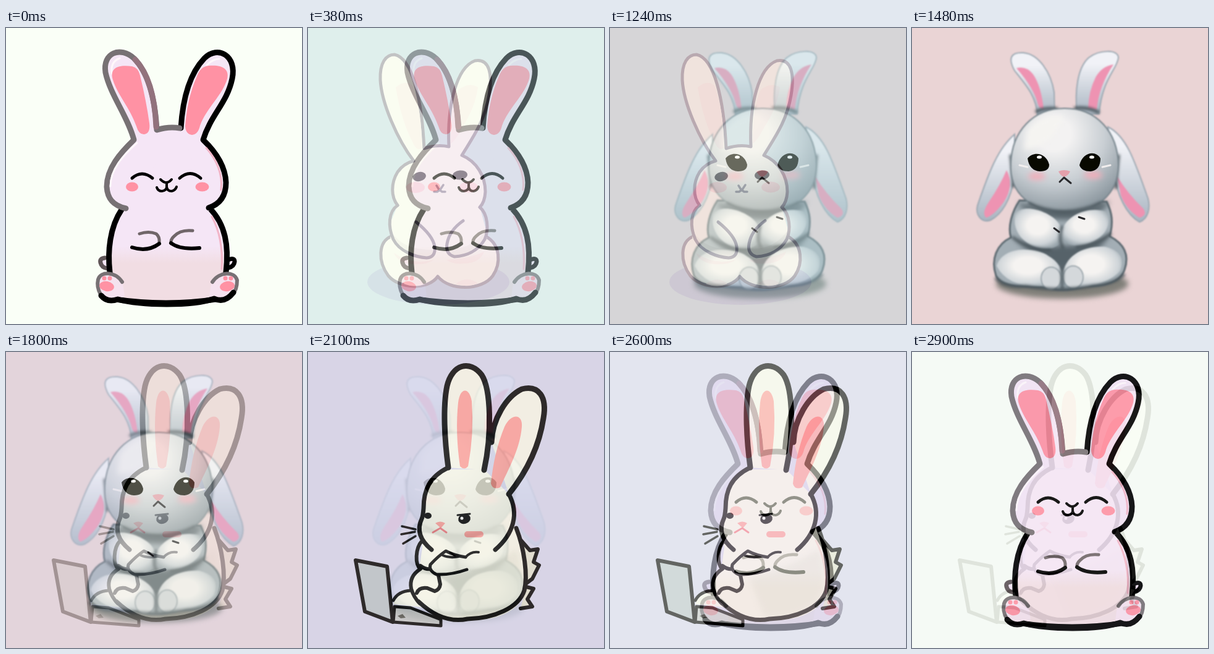
These frames come from a looping animation (479 by 479 pixels, 2960 ms). An HTML page:

```html
<!DOCTYPE html>
<html lang="en">
<head>
<meta charset="utf-8">
<title>Four rabbits</title>
<style>
  html, body { margin: 0; height: 100%; overflow: hidden; }
  svg { display: block; width: 100vw; height: 100vh; }
  .line { fill: none; }
  .line, .ink { stroke-linecap: round; stroke-linejoin: round; }
  .soft { filter: blur(4px); }
  .crease { fill: none; stroke: #465157; filter: blur(2.2px); }
  .hazy { filter: blur(.8px); }
</style>
</head>
<body>
<svg viewBox="0 0 479 479">
  <defs>
    <linearGradient id="belly" x2="0" y2="1">
      <stop offset=".4" stop-color="#f5e6f6"/><stop offset=".58" stop-color="#f1dde3"/>
    </linearGradient>
    <radialGradient id="fur" cx=".4" cy=".25" r=".8">
      <stop offset=".2" stop-color="#f3f2f2"/><stop offset=".6" stop-color="#c8ced3"/><stop offset="1" stop-color="#87939b"/>
    </radialGradient>
    <radialGradient id="paw" cx=".48" cy=".42" r=".62">
      <stop offset=".35" stop-color="#f5f3f1"/><stop offset=".75" stop-color="#ced4d8"/><stop offset="1" stop-color="#98a4ab"/>
    </radialGradient>
    <linearGradient id="lop" x2="0" y2="1">
      <stop offset=".2" stop-color="#f1f2f7"/><stop offset="1" stop-color="#a9b5c1"/>
    </linearGradient>
  </defs>

  <!-- smiling pink rabbit -->
  <g class="scene">
    <path fill="#fafff7" d="M0 0h479v479H0z"/>
    <g class="ink" stroke="#000" stroke-width="9" fill="#f5e6f6">
      <path stroke="#5f5557" stroke-width="7" d="M160 372Q151 373 153 380Q155 388 164 389"/>
      <path stroke-width="7" d="M360 375Q370 371 370 378Q369 386 360 388"/>
      <path fill="url(#belly)" d="M187 294C168 322 164 362 168 395L170 438Q260 452 346 438L356 395C361 352 355 318 330 292"/>
      <path stroke="none" d="M207 181C188 199 164 222 163 254C163 274 172 286 194 296H328C347 284 356 268 354 246C352 221 338 200 319 181L366 78L345 42L302 71L283 162Q263 159 244 164L238 110L206 48L162 58Z"/>
      <path d="M283 162C286 114 298 73 321 49C343 27 374 45 366 82C358 121 331 141 319 181C340 201 355 225 356 250C356 272 346 285 328 291"/>
      <g stroke="#777174">
        <path d="M194 292C172 287 164 275 163 257C163 227 185 202 207 181C197 143 169 109 161 72C156 40 185 29 207 49C230 72 241 112 244 165Q263 159 281 162"/>
        <path class="line" stroke="#92727d" d="M209 51C230 73 241 112 243 160"/>
      </g>
    </g>
    <path class="line" stroke="#fff8fb" stroke-width="3" d="M171 74Q169 54 184 49M169 256C169 228 190 206 212 186M325 60Q335 50 345 50"/>
    <path class="line" stroke="#f3b6c8" stroke-width="3" d="M324 194C341 213 351 237 348 262M333 305Q352 340 349 390"/>
    <g fill="#ff92a4">
      <path d="M173 84C167 64 182 59 204 62Q214 64 217 77Q227 118 232 154Q234 170 224 172Q215 173 211 159C201 130 181 109 173 84Z"/>
      <path d="M358 82C362 66 349 59 328 61Q315 62 309 78C297 105 292 133 290 159Q291 172 301 173Q311 172 314 158C324 130 351 108 358 82Z"/>
      <ellipse cx="204" cy="257" rx="10" ry="7.5"/><ellipse cx="317.500" cy="257" rx="11" ry="7.5"/>
    </g>
    <g class="line" stroke="#000" stroke-width="5">
      <path d="M204 243Q220 229 237 243M281 243Q298 228 315 243"/>
      <path stroke-width="4" d="M250 245Q255 250 259 250Q264 250 268 245M260 251V257M244 258Q246 264 252 264Q260 263 260 257Q261 264 268 264Q274 263 276 257"/>
      <path stroke="#706669" d="M216 333Q231 328 243 333Q249 338 248 347M302 328Q282 326 272 337Q266 342 267 349"/>
      <path stroke-width="6" d="M204 355Q229 363 248 349M267 348Q281 359 313 356"/>
    </g>
    <g class="ink" stroke="#777174" stroke-width="6" fill="#f5e2ef">
      <path d="M189 413C177 394 153 393 149 407C147 427 157 441 176 440L192 434Z" stroke="none"/>
      <path class="line" d="M188 411C177 394 153 393 149 407C147 416 149 424 153 431"/>
      <path d="M332 413C344 394 370 393 374 408C374 425 364 441 344 440L329 434Z" stroke="none"/>
      <path class="line" d="M334 411C345 394 370 393 374 408C374 419 371 427 366 432"/>
      <path class="line" stroke="#000" stroke-width="9" d="M154 433Q164 445 181 439Q210 447 260 447Q310 447 337 438Q354 446 368 428"/>
    </g>
    <g fill="#ff92a4">
      <ellipse cx="163" cy="418" rx="12" ry="8" transform="rotate(10 163 418)"/>
      <ellipse cx="358" cy="418" rx="12" ry="8" transform="rotate(-10 358 418)"/>
      <circle cx="159" cy="405" r="3.500"/><circle cx="168" cy="405" r="3.500"/>
      <circle cx="355" cy="405" r="3.500"/><circle cx="364" cy="405" r="3.500"/>
    </g>
  </g>

  <!-- cream rabbit on blue -->
  <g class="scene">
    <path fill="#b8d8dc" d="M0 0h479v479H0z"/>
    <ellipse cx="211" cy="411" rx="115" ry="37" fill="#a2b7d0"/>
    <g class="ink" stroke="#716a79" stroke-width="5" fill="#fbfbea">
      <path d="M135 337C113 346 113 378 130 401C148 422 194 425 210 402C229 426 282 425 299 401C313 380 311 351 289 338Z"/>
      <g fill="#fbebdf" stroke="none">
        <path d="M139 364Q170 385 204 375Q192 384 167 382Q145 379 139 364ZM224 375Q259 374 285 362Q278 380 254 381Q233 383 224 375Z"/>
        <path d="M155 414Q174 400 190 414Q174 421 155 414ZM239 414Q257 400 275 413Q257 421 239 414Z"/>
      </g>
      <path stroke="none" d="M145 287L171 215L249 206L278 289L290 340L224 375H200L133 340Z"/>
      <path stroke="none" d="M145 287L132 318L150 358L190 372L206 357L224 357L240 370L270 360L289 330L278 290Z"/>
      <g stroke="none" fill="#ecebda">
        <path d="M135 330Q153 359 201 359Q205 370 190 371Q143 364 135 330ZM228 357Q266 359 289 326Q289 363 237 370Q228 367 228 357Z"/>
      </g>
      <path stroke="none" d="M145 287H278L288 262L249 206H171L136 262Z"/>
      <path d="M145 287C134 273 134 251 145 233Q155 219 171 215C145 181 119 122 117 84C116 56 126 43 140 43C169 49 184 115 188 195Q208 188 228 192C225 126 240 64 270 53C293 49 299 73 293 109C286 151 266 178 249 206C273 216 287 240 287 265Q286 282 278 290"/>
      <path class="line" d="M145 287C130 297 129 321 138 342C148 362 175 371 192 372Q207 371 205 354C203 340 190 326 175 314M278 290C291 301 293 326 286 342C275 361 256 369 237 370Q222 366 225 349C228 332 238 321 251 312"/>
    </g>
    <g fill="#fcece0">
      <path d="M142 96Q157 83 169 93Q185 137 184 194Q177 200 171 188Q151 151 142 96Z"/>
      <path d="M244 100Q260 87 275 96Q270 130 250 160Q238 183 231 187Q230 130 244 100Z"/>
    </g>
    <ellipse cx="180" cy="240.500" rx="11" ry="7.500" transform="rotate(-12 180 240)"/>
    <ellipse cx="246" cy="238" rx="12" ry="7.500" transform="rotate(-6 246 238)"/>
    <g fill="#fdd2cd"><ellipse cx="174" cy="258" rx="15" ry="9"/><ellipse cx="260" cy="257.500" rx="15" ry="9"/></g>
    <path class="line" stroke="#686873" stroke-width="3.500" d="M208 255L213 263L219 254M204 265H209L213 262L217 265L222 265"/>
  </g>

  <!-- painted grey rabbit -->
  <g class="scene">
    <path fill="#ead4d5" d="M0 0h479v479H0z"/>
    <ellipse class="soft" cx="243" cy="414" rx="107" ry="24" fill="#807f79"/>
    <g class="hazy">
      <g fill="url(#lop)" stroke="#9aa7b1" stroke-width="2">
        <path d="M203 142C201 111 186 94 166 69C154 47 162 39 180 40C205 42 225 72 230 104L231 140Z"/>
        <path d="M267 140C263 101 268 64 286 48C303 35 334 34 334 48C332 67 307 83 303 139Z"/>
        <path d="M166 172C139 195 125 232 106 287C102 303 113 316 127 311C145 302 160 279 166 239Z"/>
        <path d="M317 160C346 174 359 211 382 276C386 292 382 309 368 314C347 302 332 271 327 235Z"/>
      </g>
      <g fill="#ee93b2">
        <path d="M169 65Q185 61 196 75Q209 94 213 131Q207 132 204 124Q198 98 169 65Z"/>
        <path d="M326 59Q307 62 297 80Q286 102 285 130L299 132Q302 95 326 59Z"/>
        <path d="M153 230Q166 254 149 281Q133 303 120 307Q112 300 124 282Q143 254 153 230Z"/>
        <path d="M332 240Q349 268 374 292Q382 303 368 307Q347 294 338 271Z"/>
      </g>
      <path class="crease" stroke-width="5" d="M200 136Q213 128 236 131M262 130Q285 127 303 137M160 205Q165 245 164 258M334 205Q329 245 330 260"/>
      <path fill="#a3aeb5" stroke="#5c6970" stroke-width="3" d="M174 279C161 298 155 322 160 339C137 350 127 374 136 401C146 420 183 419 211 419Q244 430 280 418C309 419 337 412 344 391C353 365 341 348 320 337C326 315 324 299 315 281Z"/>
      <path class="soft" fill="#566269" d="M171 282Q246 306 319 280Q310 306 248 310Q187 308 171 282ZM163 337Q193 356 240 352Q291 354 322 332Q303 366 243 392Q187 366 163 337Z"/>
      <g fill="url(#paw)">
        <path d="M167 301C180 283 220 296 235 313C252 335 241 357 220 357C191 359 160 335 167 301Z"/>
        <path d="M243 327C251 301 288 288 314 297C329 324 301 350 268 352C249 353 239 341 243 327Z"/>
        <path d="M137 385C147 352 200 354 221 369Q244 382 242 405Q234 426 211 418Q154 420 137 385Z"/>
        <path d="M244 400C247 370 275 352 313 354Q348 362 337 393Q318 416 257 422Q241 419 244 400Z"/>
      </g>
      <g fill="#d4d8db" stroke="#8c989f" stroke-width="1.500">
        <ellipse cx="225" cy="405" rx="16" ry="18"/><ellipse cx="261" cy="403" rx="16" ry="18"/>
      </g>
      <path class="crease" stroke-width="4" d="M135 404Q148 421 184 418Q242 428 294 417Q330 414 344 398M243 320Q236 342 245 357M162 338Q190 360 225 359M265 355Q302 351 322 332M243 385V422"/>
      <path fill="url(#fur)" stroke="#75838b" stroke-width="2" d="M247 130C195 130 162 168 160 218C157 269 193 297 247 296C301 297 333 270 334 222C333 168 299 130 247 130Z"/>
      <path class="soft" fill="#f5f4f1" d="M186 166Q211 139 244 142Q234 188 181 198Z"/>
      <g class="soft" fill="#f1adb9"><ellipse cx="202" cy="240" rx="14" ry="6"/><ellipse cx="293" cy="238" rx="15" ry="6"/></g>
      <path class="crease" stroke-width="4" d="M188 283Q246 311 307 282"/>
    </g>
    <path fill="#080900" d="M187 211C197 199 217 202 222 221Q222 232 207 232Q190 231 187 211ZM271 222C276 201 297 197 305 211Q305 230 289 232Q274 232 271 222Z"/>
    <g fill="#fff"><ellipse cx="206" cy="209" rx="4" ry="2.500"/><ellipse cx="291" cy="209" rx="4" ry="2.500"/></g>
    <path class="line" stroke="#f1eeee" stroke-width="3" d="M174 222L187 225M308 225L321 222"/>
    <path fill="#e3a0ab" d="M237 232Q246 228 256 232Q252 240 246 241Q240 239 237 232Z"/>
    <path class="line" stroke="#28282b" stroke-width="3" d="M239 249L246 242L257 251M230 324L238 330M270 306L279 309"/>
  </g>

  <!-- rabbit with laptop -->
  <g class="scene">
    <path fill="#d4d5eb" d="M0 0h479v479H0z"/>
    <g class="ink" stroke="#000" stroke-width="6" fill="#f5f5e7">
      <path fill="#c3c6c6" stroke-width="5" d="M138 437L140 412L166 414L215 433V443Z"/>
      <path stroke="none" fill="#55564f" d="M145 427L153 424L158 430L150 431Z"/>
      <path fill="#b9c3c8" d="M77 337L128 347L137 437L92 420Z"/>
      <path stroke="none" d="M138 408Q145 387 166 385L185 413Z"/>
      <path class="line" stroke-width="5" d="M138 402Q146 387 166 386"/>
      <path fill="#dfe0ce" d="M345 305L359 321L372 319L365 340L374 345L363 367L351 376M353 380L365 383L355 400L363 412L344 415"/>
      <path stroke="none" d="M196 211L224 190L285 190L325 230C336 253 334 270 334 282C350 308 356 349 353 383C346 419 303 437 258 433C232 438 194 428 179 402C158 377 164 362 180 352L185 316L180 285Z"/>
      <path fill="#e8e9d9" stroke="none" d="M225 365Q291 350 338 319Q359 386 327 411Q291 433 249 427Z" class="soft"/>
      <g stroke-width="9">
        <path d="M227 187C221 143 218 89 225 55C233 20 262 12 281 37C296 60 298 132 285 191M297 146C298 109 321 72 346 60C374 53 387 73 381 107C374 154 353 195 325 230"/>
      </g>
      <path class="line" stroke-width="7" d="M227 187C196 202 187 224 187 253Q186 266 184 270C175 289 183 306 200 320M325 230C342 261 333 294 303 320M337 285C350 318 356 362 350 386C341 414 301 431 258 432C225 439 197 421 179 404"/>
      <path class="line" stroke-width="6" d="M185 305C173 318 173 344 182 351Q163 363 167 383Q171 397 181 407M176 390Q180 380 193 382L205 387Q213 385 214 376L211 361M182 346Q193 354 201 350"/>
      <path stroke-width="5" d="M255 332Q236 329 223 322Q211 330 198 344Q195 354 208 360Q232 361 257 352"/>
      <path class="line" stroke-width="4" d="M218 329Q229 334 244 331M255 332Q264 322 276 324"/>
      <path class="line" stroke-width="3.500" d="M152 282L174 287M151 295L173 291M154 310L174 298"/>
    </g>
    <g fill="#fb9e98">
      <path d="M243 82C246 57 261 56 265 80Q269 133 259 185Q253 192 246 185Q238 130 243 82Z"/>
      <path d="M318 121C329 98 348 100 346 121C343 158 324 190 311 219Q299 224 296 213Q301 162 318 121Z"/>
      <path d="M206 277Q214 272 222 277L215 285Z"/>
      <rect x="253" y="290" width="31" height="10" rx="5"/>
    </g>
    <path class="line" stroke="#f37d82" stroke-width="3" d="M202 292L214 285L224 292"/>
    <ellipse cx="194" cy="265" rx="6" ry="5"/>
    <ellipse cx="253" cy="270" rx="10" ry="8" transform="rotate(-15 253 270)"/>
    <path class="line" stroke="#000" stroke-width="3" d="M242 264L262 262"/>
    <circle cx="249" cy="269" r="2.500" fill="#fff"/>
  </g>
</svg>
<script>
  const scenes = [...document.querySelectorAll('.scene')];
  const LEG = 740, HOLD = 200, STEP = 60;

  // Each scene holds, then dissolves to the next in tenths.
  function draw() {
    const t = performance.now() % (LEG * scenes.length);
    const now = Math.floor(t / LEG), u = t % LEG;
    const mix = u < HOLD ? 0 : (Math.floor((u - HOLD) / STEP) + 1) / 10;
    const last = now === scenes.length - 1;
    const lower = last ? 0 : now, upper = last ? now : now + 1;
    scenes.forEach((s, i) => {
      s.style.opacity = i === lower ? 1 : i === upper ? (last ? 1 - mix : mix) : 0;
    });
    requestAnimationFrame(draw);
  }
  draw();
</script>
</body>
</html>
```
